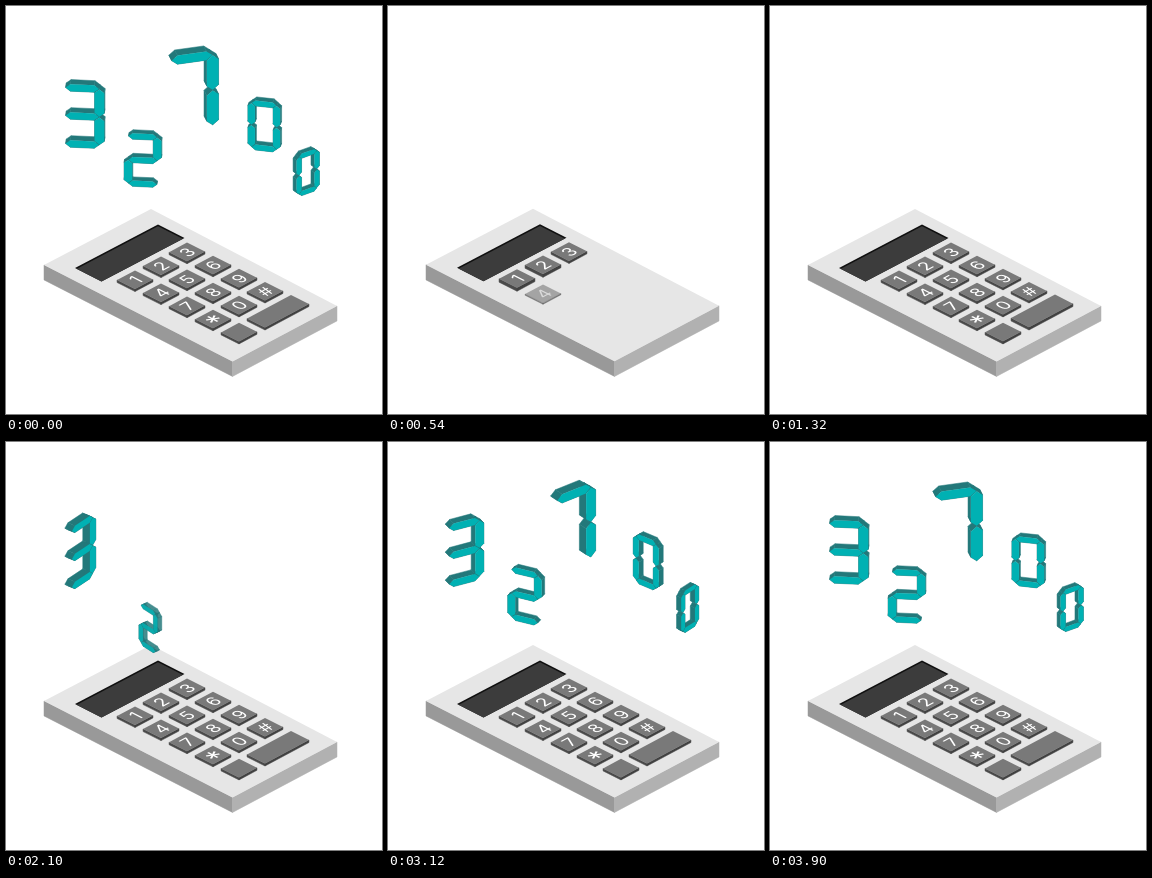
These frames come from a looping animation (376 px wide and 408 px high, 4400 ms). An HTML page with a canvas:

```html
<!DOCTYPE html>
<html>
<head>
<meta charset="utf-8">
<style>
html, body { margin: 0; width: 100%; height: 100%; overflow: hidden; background: #fff; }
canvas { display: block; width: 376px; height: 408px; }
</style>
</head>
<body>
<canvas id="stage" width="376" height="408"></canvas>
<script>
const ctx = document.getElementById('stage').getContext('2d');
const LOOP = 4400, END = 3900, STEP = 30;
const SLOPE = 0.52;          // vertical squash of the ground plane
const BODY_H = 14.9, KEY_H = 2.5;
const PRESS = 200, RISE = 440, MAX_TURN = 52;

const clamp = (v, a = 0, b = 1) => Math.min(b, Math.max(a, v));
const mix = (a, b, p) => a + (b - a) * p;
const grey = v => `rgb(${Math.round(v)},${Math.round(v)},${Math.round(v)})`;

function outBack(p, c) {
  const q = clamp(p) - 1;
  return 1 + (c + 1) * q * q * q + c * q * q;
}

function poly(points, fill, seam) {
  ctx.beginPath();
  points.forEach(([x, y]) => ctx.lineTo(x, y));
  ctx.closePath();
  ctx.fillStyle = fill;
  ctx.fill();
  if (seam) {
    ctx.strokeStyle = fill;
    ctx.lineWidth = 0.5;
    ctx.stroke();
  }
}

const lift = (points, h) => points.map(([x, y]) => [x, y - h]);

// Block from ground corners [back, right, front, left]
function block(base, h, top, left, right) {
  const up = lift(base, h);
  poly([up[3], up[2], base[2], base[3]], left, true);
  poly([up[2], up[1], base[1], base[2]], right, true);
  poly(up, top);
}

// Calculator body and screen
const BASE = [[145, 217.9], [331, 314.9], [226.5, 370.4], [38, 273.9]];
const SCREEN = [[152, 218.5], [178.5, 232], [95.5, 275.5], [69, 262]];

function drawBody(t) {
  const h = BODY_H * outBack(t / 600, 2.4);
  ctx.globalAlpha = clamp(t / 120);
  block(BASE, h, '#e6e6e6', '#999999', '#b1b1b1');
  const shift = h - BODY_H;
  const dark = clamp((t - 200) / 220);
  if (dark > 0) {
    const rim = lift(SCREEN, shift);
    ctx.save();
    poly(rim, grey(mix(230, 16, clamp(dark * 2.4))));
    ctx.clip();
    poly(lift(rim, -1.8), grey(mix(230, 60, dark)));
    ctx.restore();
  }
  ctx.globalAlpha = 1;
  return shift;
}

// Keypad
const KEYS = [...'123456789*0#'].map((label, i) => ({ label, row: Math.floor(i / 3), col: i % 3, span: 1 }));
KEYS.push({ label: '', row: 4, col: 0, span: 1 }, { label: '', row: 4, col: 1, span: 2 });

const gridPoint = (row, col) => [129 + 26 * (row + col), 273.7 + KEY_H + 13.1 * row - 13.9 * col];

function drawLabel(label, [x, y]) {
  ctx.save();
  ctx.transform(0.88, -0.474, 0.88, 0.447, x, y);
  ctx.font = `${label === '*' ? 27 : 17}px Inter, "Liberation Sans", sans-serif`;
  ctx.fillStyle = '#fff';
  const m = ctx.measureText(label);
  ctx.fillText(label,
    (m.actualBoundingBoxLeft - m.actualBoundingBoxRight) / 2,
    (m.actualBoundingBoxAscent - m.actualBoundingBoxDescent) / 2);
  ctx.restore();
}

function pressDepth(label, t) {
  let depth = 0;
  for (const d of DIGITS) {
    const p = (t - d.start + 50) / PRESS;
    if (d.key === label && p > 0 && p < 1) depth = Math.sin(p * Math.PI);
  }
  return depth;
}

function drawKey(key, i, t, shift) {
  const age = t - 360 - 50 * i;
  if (age <= 0) return;
  const k = 0.69 / 2, { row, col, span } = key;
  const last = col + span - 1;
  const base = [
    gridPoint(row - k, last + k), gridPoint(row + k, last + k),
    gridPoint(row + k, col - k), gridPoint(row - k, col - k)
  ];
  const h = KEY_H * outBack(age / 400, 4) * (1 - 0.8 * pressDepth(key.label, t));
  ctx.globalAlpha = clamp(age / 50);
  block(lift(base, shift), h, '#797979', '#4a4a4a', '#414141');
  if (key.label) drawLabel(key.label, lift([gridPoint(row, col)], h + shift)[0]);
  ctx.globalAlpha = 1;
}

// Floating digits: a0 is the turn in degrees at 3120 ms, a1 at the end
const DIGITS = [
  { key: '3', start: 1650, x: 76.3, y: 110.3, w: 44, h: 63, d: 9, a0: -27, a1: 5, segs: 'abgcd' },
  { key: '2', start: 1900, x: 136.7, y: 154.3, w: 37.5, h: 53, d: 7, a0: 25, a1: 5, segs: 'abged' },
  { key: '7', start: 2150, x: 186, y: 87, w: 55, h: 79, d: 11, a0: -38, a1: -15, segs: 'abc' },
  { key: '0', start: 2400, x: 258, y: 120.2, w: 33, h: 49.5, d: 7, a0: 39, a1: 12, segs: 'abcdef' },
  { key: '0', start: 2650, x: 302, y: 166.4, w: 28, h: 42, d: 6, a0: -51, a1: -35, segs: 'abcdef' }
];

// Segment ends in units of half width and half height
const SEGS = {
  a: [-1, -1, 1, -1], b: [1, -1, 1, 0], c: [1, 0, 1, 1], d: [-1, 1, 1, 1],
  e: [-1, 0, -1, 1], f: [-1, -1, -1, 0], g: [-1, 0, 1, 0]
};

function segment(name, w, h) {
  const tx = w * 0.11, ty = h * 0.055, gap = 0.4;
  const [ax, ay, bx, by] = SEGS[name];
  const x0 = ax * (w / 2 - tx), x1 = bx * (w / 2 - tx);
  const y0 = ay * (h / 2 - ty), y1 = by * (h / 2 - ty);
  if (y0 === y1) {
    const l = x0 + gap, r = x1 - gap;
    return [[l, y0], [l + tx, y0 - ty], [r - tx, y0 - ty], [r, y0], [r - tx, y0 + ty], [l + tx, y0 + ty]];
  }
  const u = y0 + gap, v = y1 - gap;
  return [[x0, u], [x0 + tx, u + ty], [x0 + tx, v - ty], [x0, v], [x0 - tx, v - ty], [x0 - tx, u + ty]];
}

function drawDigit(g, t) {
  const age = t - g.start;
  if (age <= 0) return;
  const q = 1 - clamp(age / RISE);
  const e = 1 - q * q;
  const key = KEYS.find(k => k.label === g.key);
  const [kx, ky] = gridPoint(key.row, key.col);
  const px = mix(kx, g.x, e), py = mix(ky, g.y, e), s = 0.3 + 0.7 * e;
  const turn = clamp(mix(g.a0, g.a1, (t - 3120) / 780), -MAX_TURN, MAX_TURN) * Math.PI / 180;
  const cos = Math.cos(turn), sin = Math.sin(turn);
  const back = [sin * g.d * s, -cos * g.d * SLOPE * s];
  const faces = [...g.segs].map(name => segment(name, g.w, g.h)
    .map(([x, y]) => [px + s * x * cos, py + s * (x * sin * SLOPE + y)]));

  ctx.globalAlpha = clamp(e * 1.2);
  for (const f of faces) {
    f.forEach((p, i) => {
      const n = f[(i + 1) % f.length];
      poly([p, n, [n[0] + back[0], n[1] + back[1]], [p[0] + back[0], p[1] + back[1]]], '#23787a', true);
    });
  }
  faces.forEach(f => poly(f, '#00b1b3'));
  ctx.globalAlpha = 1;
}

function draw(now) {
  let t = Math.floor((now % LOOP) / STEP) * STEP;
  t = t < STEP ? END : Math.min(t, END);
  ctx.fillStyle = '#fff';
  ctx.fillRect(0, 0, 376, 408);
  const shift = drawBody(t);
  KEYS.forEach((key, i) => drawKey(key, i, t, shift));
  DIGITS.forEach(g => drawDigit(g, t));
}

const begin = performance.now();
function tick() {
  draw(performance.now() - begin);
  requestAnimationFrame(tick);
}
tick();
</script>
</body>
</html>
```
